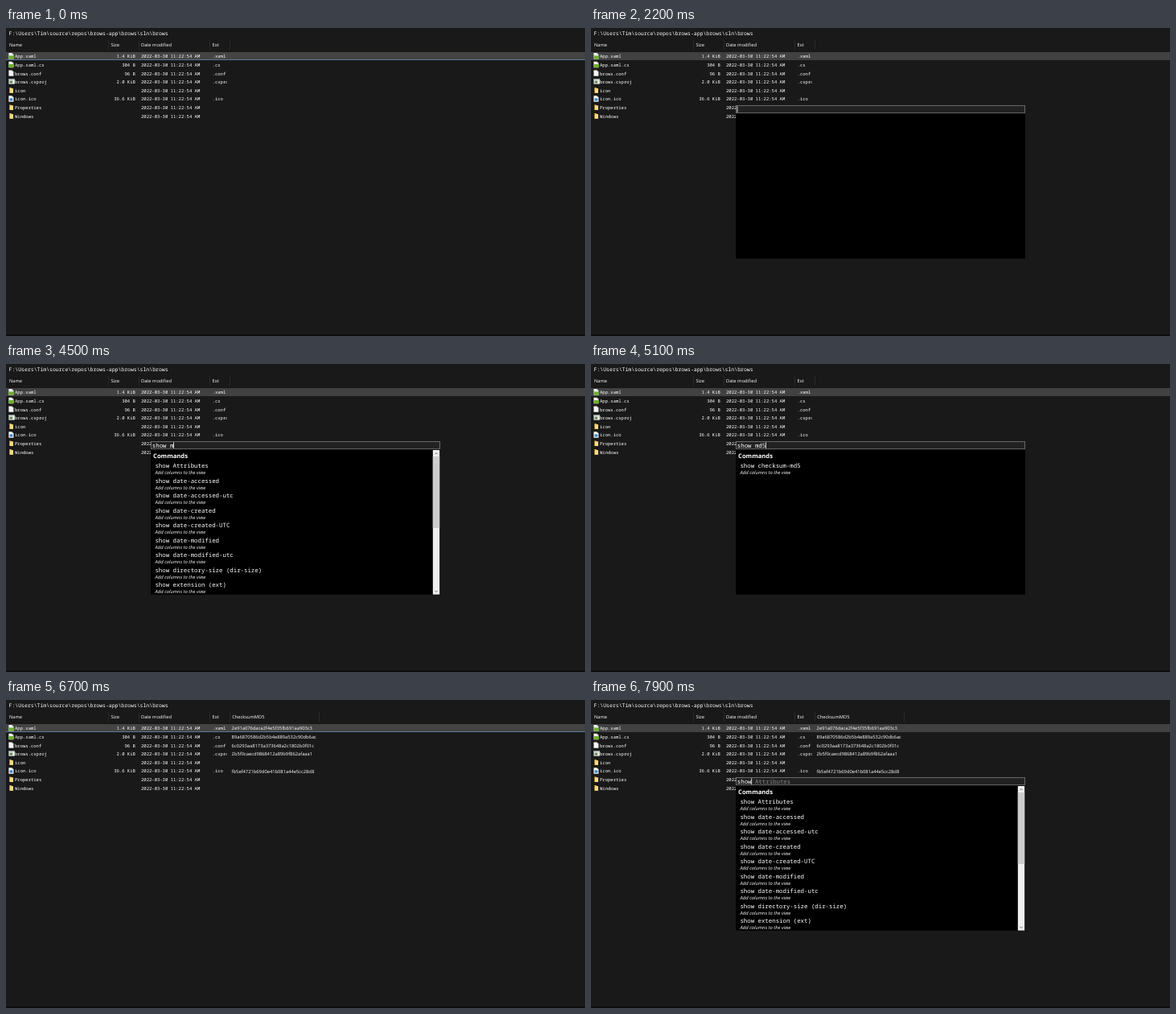
Write an HTML page that moves like this. It is 720 px wide and 383 px high and loops after 8 s.

```html
<!DOCTYPE html>
<html lang="en">
<head>
<meta charset="utf-8">
<title>File browser command palette</title>
<style>
  html, body { margin: 0; width: 100%; height: 100%; overflow: hidden; background: #191919; }
  svg { display: block; width: 100vw; height: 100vh; }
  text { white-space: pre; text-rendering: geometricPrecision; fill: #fff; font-weight: 500; }
  .mono { font-family: "Noto Sans Mono", "DejaVu Sans Mono", monospace; }
  .sans { font-family: "Open Sans", "Noto Sans", sans-serif; }
  .path { font-size: 6.48px; }
  .cell { font-size: 5.55px; }
  .name { font-size: 7.38px; }
  .head { font-size: 5.72px; }
  .sum { font-size: 5.78px; }
  .note { font-size: 5.88px; font-style: italic; }
  .title { font-size: 7.66px; font-weight: 700; }
  .ghost { fill: #858585; }
  .end { text-anchor: end; }
  .sep { fill: #2e2e2e; }
</style>
</head>
<body>
<svg viewBox="0 0 720 383" preserveAspectRatio="none">
  <defs>
    <clipPath id="extClip"><rect x="254" y="28" width="20.8" height="100"/></clipPath>
    <clipPath id="listClip"><rect x="180" y="106" width="351" height="180.4"/></clipPath>
    <g id="page"><path d="M0 0H4L6 2V7.4H0Z" fill="#f4f4f4"/><path d="M4 0V2H6Z" fill="#b5b5b5"/></g>
    <g id="code"><use href="#page"/><rect y="3.2" width="6.4" height="4.2" fill="#6fae35"/></g>
    <g id="project"><rect width="7.4" height="6.6" fill="#e9ece6"/><rect width="7.4" height="1.3" fill="#8f9a94"/><rect x="1.2" y="2.6" width="3.4" height="3" fill="#5f8f5a"/></g>
    <g id="folder"><path d="M.9 .4H3L3.7 1.3H5.5V7H.9Z" fill="#d9ae4c"/><path d="M1.5 1.6H5.5V7H1.5Z" fill="#f8dc86"/></g>
    <g id="image"><use href="#page"/><rect x="1.2" y="3" width="3.6" height="3.2" fill="#3f86c4"/></g>
  </defs>
  <rect width="720" height="383" fill="#191919"/>
  <rect y="381" width="720" height="2" fill="#110d0d"/>
  <rect id="row" y="30" width="720" height="10" fill="#444443"/>
  <rect id="focus" y="39" width="720" height="1" fill="#56759c"/>
  <g id="files"></g>
  <g id="sums"></g>
  <g id="panel">
    <rect x="180" y="106" width="360" height="180.7" fill="#000"/>
    <rect x="180.5" y="96.5" width="359" height="9.2" fill="#222" stroke="#7c7c7c" stroke-width=".8"/>
    <text class="mono name" x="181.8" y="103.5"><tspan id="typed"></tspan><tspan id="ghost" class="ghost"></tspan></text>
    <rect id="caret" y="97.3" width=".8" height="7.6" fill="#fff"/>
    <g id="commands"></g>
    <g id="columns"></g>
    <g id="match"></g>
  </g>
</svg>
<script>
const LOOP = 8000, CHAR = 4.43;
const $ = id => document.getElementById(id);
const text = (cls, x, y, s) => `<text class="${cls}" x="${x}" y="${y}">${s}</text>`;
const show = (el, on) => { el.style.display = on ? '' : 'none'; };

// File table
const files = [
  ['code', 'App.xaml', '1.4 KiB', '.xaml', '2e91a076daca2f4e5f35fb691aa903c3'],
  ['code', 'App.xaml.cs', '304 B', '.cs', '89a6870586d2b5b4e889a532c90db6ac'],
  ['page', 'brows.conf', '96 B', '.conf', '6c0293aa8173a373648a2c1802b0f01c'],
  ['project', 'brows.csproj', '2.0 KiB', '.csproj', '2b5f0caecd9868412a89b9f862afaaa1'],
  ['folder', 'icon'],
  ['image', 'icon.ico', '36.6 KiB', '.ico', 'fb5ef4721b69d0e41b081a44e5cc28d8'],
  ['folder', 'Properties'],
  ['folder', 'Windows']
];
const rowY = i => 37.2 + i * 10.65;
const separator = x => `<rect class="sep" x="${x}" y="15" width=".8" height="12"/>`;
const headers = [['Name', 4], ['Size', 130.5], ['Date modified', 168], ['Ext', 256.5]];

$('files').innerHTML =
  text('mono path', 3.6, 9.2, 'F:\\Users\\Tim\\source\\repos\\brows-app\\brows\\sln\\brows') +
  headers.map(([s, x]) => text('sans head', x, 23, s)).join('') +
  [127, 165, 253, 278].map(separator).join('') +
  files.map(([icon, name, size = '', ext = ''], i) => {
    const y = rowY(i);
    return `<use href="#${icon}" x="3.4" y="${y - 6.1}"/>` +
      text('mono cell', 11, y, name) +
      text('mono cell end', 160.8, y, size) +
      text('mono cell', 168, y, '2022-03-30 11:22:54 AM') +
      `<g clip-path="url(#extClip)">${text('mono cell', 256.6, y, ext)}</g>`;
  }).join('');

$('sums').innerHTML = text('sans head', 281.2, 23, 'ChecksumMD5') + separator(389) +
  files.map((f, i) => text('sans sum', 280.6, rowY(i) + .2, f[4] || '')).join('');

// Command lists
function list(items, step, thumb) {
  const body = items.map(([name, ...notes], i) => {
    const y = 129.3 + i * step;
    return text('mono name', 185.4, y, name) +
      notes.map((s, n) => text('sans note', 185.6, y + 7.8 + n * 7.1, s)).join('');
  }).join('');
  const bar = thumb ? `<rect x="530.8" y="107" width="8.4" height="179.6" fill="#f0f0f0"/>
    <rect x="530.8" y="115" width="8.4" height="${thumb}" fill="#cdcdcd"/>
    <path d="M533.2 112.2L535 110.4L536.8 112.2M533.2 281.8L535 283.6L536.8 281.8" fill="none" stroke="#606060" stroke-width=".9"/>` : '';
  return `<g clip-path="url(#listClip)">${text('sans title', 183, 116.6, 'Commands')}${body}</g>${bar}`;
}
const column = s => ['show ' + s, 'Add columns to the view'];

$('commands').innerHTML = list([
  ['bookmark', 'bm', 'Control+B', 'Add the active panel to the list of bookmarks'],
  ['copynext', 'copyn,cn', 'Alt+Control+C', 'Copy selection to the next panel'],
  ['copyprev', 'copyp,cp', 'Alt+Control+Shift+C', 'Copy selection to the previous panel'],
  ['movenext', 'moven,mn', 'Control+M', 'Move the selection to the next panel'],
  ['moveprev', 'movep,mp', 'Control+Shift+M', 'Move the selection to the previous panel'],
  ['newpanel']
], 32.45, 50);
$('columns').innerHTML = list([
  'Attributes', 'date-accessed', 'date-accessed-utc', 'date-created', 'date-created-UTC',
  'date-modified', 'date-modified-utc', 'directory-size (dir-size)', 'extension (ext)'
].map(column), 18.5, 89);
$('match').innerHTML = list([column('checksum-md5')], 18.5);

// Each step: start time, typed text (null = closed), visible list, ghost text, caret hidden
const steps = [
  [0, null],
  [2200, ''],
  [2400, '', 'commands'],
  [2800, '', 'commands', '', true],
  [3100, 's', 'commands'],
  [3200, 'sh', 'commands'],
  [3300, 'sho', 'commands'],
  [3400, 'show'],
  [3700, 'show', 'columns', ' Attributes'],
  [3800, 'show ', 'columns', 'Attributes'],
  [4500, 'show m', 'columns'],
  [4700, 'show md'],
  [4800, 'show md', 'match'],
  [5000, 'show md5', 'match'],
  [5700, null],
  [6800, ''],
  [6900, '', 'commands'],
  [7300, 's', 'commands'],
  [7600, 'sho', 'commands'],
  [7700, 'show'],
  [7900, 'show', 'columns', ' Attributes']
];
const SUMS_AT = 5700;
let current;

function draw(t) {
  const step = steps.findLast(s => s[0] <= t);
  if (step === current) return;
  current = step;
  const [, typed, visible, ghost = '', caretOff] = step;
  const open = typed !== null;
  show($('panel'), open);
  show($('focus'), !open);
  show($('sums'), t >= SUMS_AT);
  $('row').setAttribute('fill', open ? '#414141' : '#444443');
  for (const id of ['commands', 'columns', 'match']) show($(id), id === visible);
  $('typed').textContent = typed || '';
  $('ghost').textContent = ghost;
  show($('caret'), !caretOff);
  $('caret').setAttribute('x', 181.6 + (typed || '').length * CHAR);
}

const start = performance.now();
function tick() {
  draw((performance.now() - start) % LOOP);
  requestAnimationFrame(tick);
}
tick();
</script>
</body>
</html>
```
